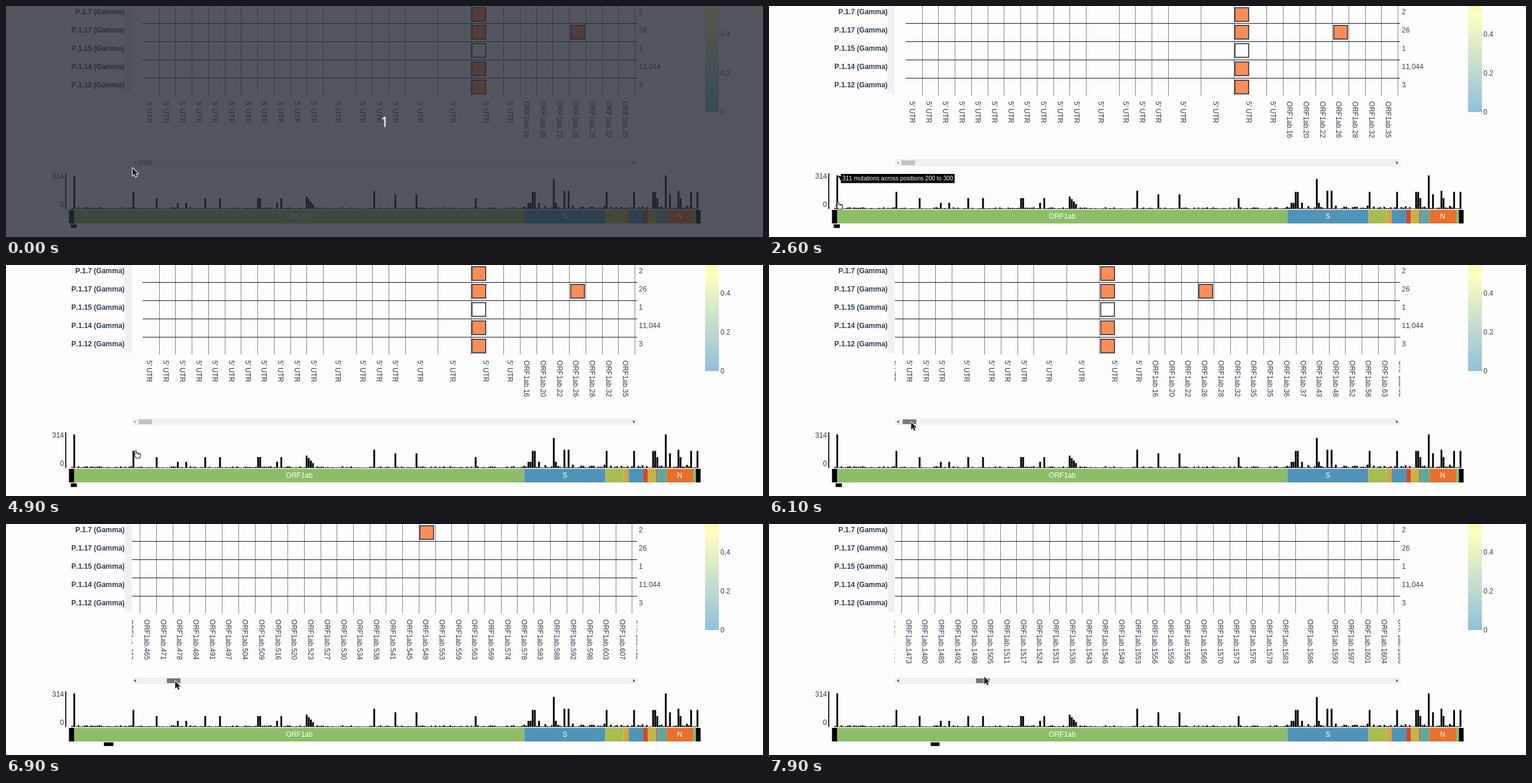
An HTML page with a canvas for the animation above (8 s loop, 1280 by 392 pixels).

```html
<!DOCTYPE html>
<html lang="en">
<head>
<meta charset="utf-8">
<title>Mutation heatmap</title>
<style>
html, body { margin: 0; width: 100%; height: 100%; overflow: hidden; background: #fefdfe; }
canvas { display: block; }
</style>
</head>
<body>
<canvas id="stage" width="1280" height="392"></canvas>
<script>
const ctx = document.getElementById('stage').getContext('2d');
ctx.fontKerning = 'none';
const LOOP = 8000, TICK = 100;
const UNIT = 27.733, LEFT = 231, VIEW_L = 212.5, VIEW_R = 1067.5;
const ROW = 30.8, GENOME_X = 106.5, BIN = 3.572, BASE = 344.5;
const SANS = '"Liberation Sans", Arial, sans-serif';
const INK = '#2c3e50', GREY = '#444', ORANGE = '#fd8d58';

// Scroll offset over time
const SCROLL = [[5600, 0], [6100, 227.3], [6500, 1900], [6900, 4746.9], [7400, 7350], [7900, 12458.9]];
// Pointer moves: start, end, x, y; it rests in between
const MOVES = [
  [0, 400, 164, 292], [500, 600, 135, 291], [600, 900, 112.5, 305], [1000, 1100, 113, 319],
  [1200, 1500, 116, 332], [2600, 2800, 166, 322], [2900, 3700, 217, 323], [4800, 4900, 219, 315],
  [4900, 5500, 238, 266.5], [6900, 7900, 238, 259]
];
// Amino acid reached at a column unit
const RESIDUE = [[23, 16], [29, 35], [32, 37.5], [38, 68], [171, 465], [179, 516], [188, 549],
  [201, 612], [449, 1473], [460, 1543], [473, 1586], [480, 1612]];

const hash = n => { const v = Math.sin(n * 127.1 + 11.7) * 43758.5453; return v - Math.floor(v); };
const clamp = v => Math.min(1, Math.max(0, v));

function track(keys, t) {
  if (t <= keys[0][0]) return keys[0][1];
  const i = keys.findIndex(k => t <= k[0]);
  if (i < 0) return keys[keys.length - 1][1];
  const [t0, v0] = keys[i - 1], [t1, v1] = keys[i];
  return v0 + (v1 - v0) * (t - t0) / (t1 - t0);
}

function pointerAt(t) {
  let x = 214, y = 275;
  for (const [start, end, toX, toY] of MOVES) {
    const p = clamp((t - start) / (end - start)), ease = p * (2 - p);
    x += (toX - x) * ease;
    y += (toY - y) * ease;
  }
  return [x, y];
}

// Columns: start unit, width in units, amino acid (0 is the untranslated region)
const columns = [];
const UTR_END = 23, WIDE_UTR = [11, 16, 18, 20];
for (let u = 0; u < 500;) {
  const utr = u < UTR_END;
  const w = (utr ? WIDE_UTR.includes(u) : u % 79 === 78) ? 2 : 1;
  columns.push({ u, w, aa: utr ? 0 : Math.floor(track(RESIDUE, u) + hash(u) * 0.9) });
  u += w;
}

// unit, row, fill
const cells = [0, 1, 2, 3, 4].map(r => [20, r, r === 2 ? '#fff' : ORANGE]);
cells.push([26, 1, ORANGE], [188, 0, ORANGE]);

// Peak bins grouped by height
const PEAKS = [
  [57, [2, 282]],
  [51, [229]],
  [31, [144, 234, 236, 288]],
  [29, [30, 219, 220, 254, 267, 276, 277, 294, 297]],
  [25, [154, 164, 284]],
  [18.5, [41, 64, 71, 89, 90, 100, 192, 278, 289]],
  [10.5, [51, 55, 98, 217, 218, 222, 230]]
];
const bars = Array.from({ length: 298 }, (_, b) => {
  if (b >= 112 && b < 116) return 21 - 4.2 * (b - 112);
  const r = hash(b);
  return 0.9 + r * r * (b > 214 ? 5 : 2);
});
PEAKS.forEach(([h, bins]) => bins.forEach(b => { bars[b] = h; }));

// end x, colour
const GENES = [
  [115.5, '#000'], [876.5, '#8dbd66'], [1013.5, '#4f94b7'], [1044.5, '#a9bc50'], [1052.5, '#d9a438'],
  [1078, '#4f94b7'], [1085.5, '#d9442a'], [1098.8, '#c5b343'], [1102.8, '#8d8879'], [1116.8, '#5ca99b'],
  [1162, '#e8702f'], [1166.5, '#8dbd66'], [1174.5, '#000']
];

function rect(x, y, w, h, fill) {
  ctx.fillStyle = fill;
  ctx.fillRect(x, y, w, h);
}
function text(s, x, y, fill, align = 'left', font = '12px ') {
  ctx.font = font + SANS;
  ctx.fillStyle = fill;
  ctx.textAlign = align;
  ctx.fillText(s, x, y);
}
function shape(points, fill, stroke, width = 1) {
  ctx.beginPath();
  points.forEach(([x, y]) => ctx.lineTo(x, y));
  ctx.closePath();
  if (stroke) {
    ctx.lineWidth = width;
    ctx.lineJoin = 'round';
    ctx.strokeStyle = stroke;
    ctx.stroke();
  }
  ctx.fillStyle = fill;
  ctx.fill();
}

function drawHeatmap(scroll) {
  ctx.save();
  ctx.beginPath();
  ctx.rect(VIEW_L, 0, VIEW_R - VIEW_L, 259);
  ctx.clip();
  for (const { u, w, aa } of columns) {
    const x = LEFT + u * UNIT - scroll, end = x + w * UNIT;
    if (end < VIEW_L - 10 || x > VIEW_R + 10) continue;
    rect(Math.round(end), 0, 1, 152, '#828186');
    ctx.save();
    ctx.translate((x + end) / 2 - 6.5, 161.8);
    ctx.rotate(Math.PI / 2);
    text(aa ? 'ORF1ab.' + aa : "5' UTR", 0, 0, INK);
    ctx.restore();
  }
  const start = Math.max(LEFT - scroll, VIEW_L);
  for (let i = 0; i < 4; i++) rect(start, Math.round(29.3 + ROW * i), VIEW_R - start, 1, '#18181a');
  for (const [u, row, fill] of cells) {
    const x = Math.round(LEFT + u * UNIT - scroll + 1.5), y = Math.round(1.5 + ROW * row);
    rect(x, y, 25, 25, '#41444c');
    rect(x + 1.8, y + 1.8, 21.4, 21.4, fill);
  }
  ctx.restore();
}

function drawSides() {
  const names = ['7', '17', '15', '14', '12'], counts = ['2', '26', '1', '11,044', '3'];
  rect(201, 0, 11.5, 149, '#f0eff1');
  names.forEach((n, i) => {
    const y = 14.4 + ROW * i;
    text(`P.1.${n} (Gamma)`, 200.6, y, INK, 'right', 'bold 12px ');
    text(counts[i], 1070, y, GREY);
  });
  const g = ctx.createLinearGradient(0, 180, 0, -152);
  g.addColorStop(0, '#91bfdb');
  g.addColorStop(0.5, '#ffffbf');
  g.addColorStop(1, '#fc8d59');
  rect(1182, 0, 23.5, 180, g);
  ['0', '0.2', '0.4'].forEach((s, i) => text(s, 1208, 184.3 - 66.4 * i, GREY));
}

function drawScrollbar(thumb, t) {
  rect(VIEW_L, 260, VIEW_R - VIEW_L, 12, '#f1f0f2');
  const fill = t >= 5600 ? '#787878' : t >= 5300 ? '#a8a8a8' : '#c1c0c2';
  rect(Math.round(224 + thumb), 262, 23, 8, fill);
  shape([[219.5, 263.2], [219.5, 268.8], [216.3, 266]], thumb > 0 ? '#404040' : '#a3a3a3');
  shape([[1060.5, 263.2], [1060.5, 268.8], [1063.7, 266]], '#404040');
}

function drawHistogram() {
  rect(100.2, 284, 1.8, 60.5, '#111');
  text('314', 98, 293.3, INK, 'right');
  text('0', 98, 341.3, INK, 'right');
  bars.forEach((h, b) => {
    if (b > 0) rect(GENOME_X + (b + 0.5) * BIN - 1.5, BASE - h, 3, h, '#000');
  });
}

function drawGenome(scroll) {
  let x = GENOME_X;
  for (const [end, fill] of GENES) {
    rect(x, 346, end - x, 23, fill);
    x = end;
  }
  text('ORF1ab', 496, 361.2, '#fff', 'center');
  text('S', 945, 361.2, '#fff', 'center');
  text('N', 1139, 361.2, '#fff', 'center');

  const place = edge => {
    const u = Math.max(0, (edge - LEFT + scroll) / UNIT);
    const c = columns.find(k => u < k.u + k.w);
    const base = c.aa ? 266 + c.aa * 3 : Math.min(84 + 12 * u, 262);
    return GENOME_X + base * BIN / 100;
  };
  const from = place(VIEW_L), to = place(VIEW_R - 6);
  rect(from, 370.5, to - from, 6.2, '#000');
}

function drawTooltip(x, tip, top, label) {
  ctx.font = '10px ' + SANS;
  const w = ctx.measureText(label).width + 5;
  rect(x + 5, top, w, 15.5, '#000');
  shape([[x, tip], [x + 5.5, top + 4], [x + 5.5, top + 12]], '#000');
  text(label, x + 7.5, top + 11.3, '#fff', 'left', '10px ');
}

function drawArrow(x, y) {
  const pts = [[0, 0], [0, 13], [3, 10.2], [5.2, 14.8], [7.4, 13.8], [5.3, 9.3], [9.4, 9.3]];
  shape(pts.map(([a, b]) => [x + a, y + b]), '#222', '#fff', 2);
}

function drawHand(x, y) {
  ctx.save();
  ctx.translate(x - 4, y - 1);
  ctx.beginPath();
  ctx.moveTo(3.2, 8.6);
  ctx.lineTo(3.2, 2);
  ctx.quadraticCurveTo(4.4, 0, 5.6, 2);
  ctx.lineTo(5.6, 5.4);
  ctx.quadraticCurveTo(7, 4, 8.1, 5.7);
  ctx.quadraticCurveTo(9.4, 4.6, 10.4, 6.2);
  ctx.quadraticCurveTo(12.5, 5.6, 12.6, 7.6);
  ctx.quadraticCurveTo(12.6, 11, 11.2, 12);
  ctx.lineTo(11.2, 14);
  ctx.lineTo(5, 14);
  ctx.lineTo(4.6, 12.4);
  ctx.lineTo(1, 9);
  ctx.quadraticCurveTo(0.8, 7, 3.2, 8.6);
  ctx.closePath();
  ctx.fillStyle = '#fff';
  ctx.fill();
  ctx.strokeStyle = '#222';
  ctx.lineWidth = 1.1;
  ctx.stroke();
  ctx.beginPath();
  for (const k of [8.1, 10.3]) {
    ctx.moveTo(k, 6);
    ctx.lineTo(k, 8);
  }
  ctx.stroke();
  ctx.restore();
}

function drawCountdown(t) {
  const left = 1 - clamp(t / 400);
  if (left === 0) return;
  rect(0, 0, 1280, 392, `rgba(38,42,51,${0.79 * left})`);
  ctx.font = '24px "Noto Sans", sans-serif';
  ctx.textAlign = 'center';
  ctx.fillStyle = `rgba(255,255,255,${left})`;
  ctx.fillText('1', 640, 205);
}

function draw(t) {
  const scroll = track(SCROLL, t), thumb = scroll / 99;
  rect(0, 0, 1280, 392, '#fefdfe');
  drawHeatmap(scroll);
  drawSides();
  drawScrollbar(thumb, t);
  drawHistogram();
  drawGenome(scroll);
  if (t >= 1300 && t < 2700) drawTooltip(116.5, 288, 285, '311 mutations across positions 200 to 300');
  if (t >= 3400 && t < 4900) drawTooltip(217, 315, 307.5, '163 mutations across positions 3000 to 3100');
  drawCountdown(t);

  const [x, y] = pointerAt(t);
  if (t < 300 || t >= 5200) drawArrow(x + thumb, y);
  else drawHand(x, y);
}

const begin = performance.now();
function frame() {
  const t = (performance.now() - begin) % LOOP;
  draw(Math.floor(t / TICK) * TICK);
  requestAnimationFrame(frame);
}
frame();
</script>
</body>
</html>
```
